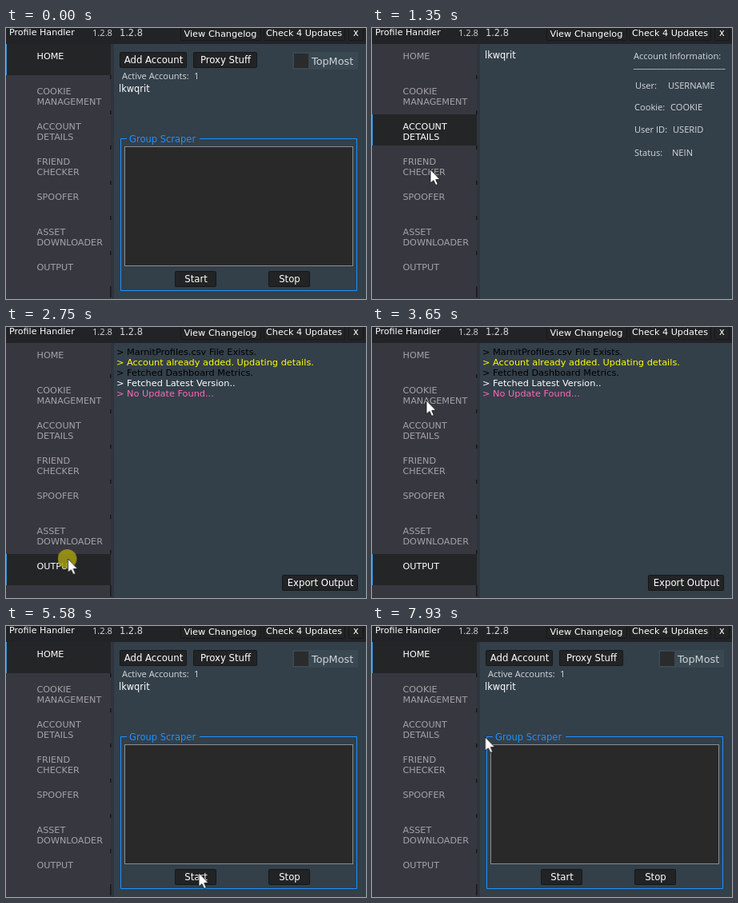
An HTML page that plays this animation: 450x339 px, repeating every 8 s.

```html
<!DOCTYPE html>
<html lang="en">
<head>
<meta charset="utf-8">
<title>Tool window</title>
<style>
html, body { margin: 0; width: 100%; height: 100%; overflow: hidden; background: #333f49; }
svg { display: block; }
text { font: 11.4px "DejaVu Sans", sans-serif; fill: #fff; white-space: pre; }
.ui { font: 11.1px "Open Sans", sans-serif; fill: #d6d9db; }
.tab { font-size: 11.2px; fill: #a3a2a8; }
.log { font-size: 11.3px; }
.on { fill: #fff; }
.btn { fill: #222324; stroke: #15181a; }
.mid { text-anchor: middle; font-size: 11.7px; }
.ink { fill: #000; }

.page { animation: 8s step-end infinite; }
#home { animation-name: home; }
#cookie { animation-name: cookie; }
#account { animation-name: account; }
#friend { animation-name: friend; }
#spoofer { animation-name: spoofer; }
#asset { animation-name: asset; }
#output { animation-name: output; }
@keyframes home { 0%, 47.5% { visibility: visible } 5.625% { visibility: hidden } }
@keyframes cookie { 0%, 11.75% { visibility: hidden } 5.625% { visibility: visible } }
@keyframes account { 0%, 17.75% { visibility: hidden } 11.75% { visibility: visible } }
@keyframes friend { 0%, 23.375% { visibility: hidden } 17.75% { visibility: visible } }
@keyframes spoofer { 0%, 30% { visibility: hidden } 23.375% { visibility: visible } }
@keyframes asset { 0%, 33.5% { visibility: hidden } 30% { visibility: visible } }
@keyframes output { 0%, 47.5% { visibility: hidden } 33.5% { visibility: visible } }

#cursor { animation: move 8s linear infinite; }
@keyframes move {
  0%, 1.5% { transform: translate(-30px, 60px) }
  5.625%, 6.5% { transform: translate(76px, 88px) }
  11.75%, 12.5% { transform: translate(75px, 132px) }
  16.875%, 18.375% { transform: translate(73px, 177px) }
  23.375%, 24.375% { transform: translate(76px, 218px) }
  29%, 31% { transform: translate(77.5px, 260px) }
  33.5%, 36% { transform: translate(77.5px, 290px) }
  43.75% { transform: translate(75px, 150px) }
  47.25%, 48.75% { transform: translate(62px, 42px) }
  53.5% { transform: translate(236px, 153px) }
  57.875% { transform: translate(267.5px, 252px) }
  64%, 65% { transform: translate(225px, 311px) }
  65.625%, 69.75% { transform: translate(241px, 309px) }
  74.375% { transform: translate(257px, 250px) }
  79.375% { transform: translate(241px, 188px) }
  81%, 87.625% { transform: translate(250.5px, 154.5px) }
  90.6% { transform: translate(269px, 115px) }
  93.75% { transform: translate(240px, 79px) }
  97.375% { transform: translate(169px, 91px) }
  99.125%, 100% { transform: translate(141.5px, 139px) }
}
#click { animation: click 8s step-end infinite; }
@keyframes click {
  0%, 8%, 14.2%, 20.2%, 25.8%, 32.3%, 36%, 50% { visibility: hidden }
  5.625%, 11.75%, 17.75%, 23.375%, 30%, 33.5%, 47.5% { visibility: visible }
}
</style>
</head>
<body>
<svg id="stage" width="450" height="339" viewBox="0 0 450 339"></svg>
<script>
const text = (x, y, s, cls = "", style = "") =>
  `<text x="${x}" y="${y}" class="${cls}" style="${style}">${s}</text>`;
const ui = (x, y, s, fill = "") => text(x, y, s, "ui", fill && `fill:${fill}`);
const rect = (x, y, w, h, fill, stroke = "none") =>
  `<rect x="${x}" y="${y}" width="${w}" height="${h}" fill="${fill}" stroke="${stroke}"/>`;
const button = (x, y, w, h, label) =>
  `<rect class="btn" x="${x + .5}" y="${y + .5}" width="${w - 1}" height="${h - 1}" rx="1"/>` +
  text(x + w / 2 + .5, y + h / 2 + 4, label, "mid");
const lines = (x, y, list, draw) => list.map((s, i) => draw(x, y + 13 * i, s)).join("");

const tabs = [
  ["home", "HOME"], ["cookie", "COOKIE", "MANAGEMENT"], ["account", "ACCOUNT", "DETAILS"],
  ["friend", "FRIEND", "CHECKER"], ["spoofer", "SPOOFER"],
  ["asset", "ASSET", "DOWNLOADER"], ["output", "OUTPUT"]
];
const label = (i, cls) =>
  lines(38.5, 39 + 44 * i, tabs[i].slice(1), (x, y, s) => text(x, y, s, "tab " + cls));

const user = "lkwqrit";
const pages = {
  home:
    button(142, 30, 84, 20, "Add Account") + button(234, 30, 80, 20, "Proxy Stuff") +
    rect(358, 30, 82, 22, "#3a4852") + rect(360, 32, 18, 18, "#2a2b2c") +
    text(382, 46, "TopMost", "", "font-size:12.8px;fill:#cfd6d8") +
    ui(145, 64, "Active Accounts:") + ui(235, 64, "1") + text(141, 80, user) +
    `<path d="M151 138.5H143.5V328.5H438.5V138.5H242" fill="none" stroke="#1e90ff"/>` +
    text(154, 143, "Group Scraper", "", "fill:#1e90ff;font-size:11.5px") +
    rect(148.5, 148.5, 285, 149, "#292929", "#8a8c8e") +
    button(211, 304, 52, 20, "Start") + button(328, 304, 52, 20, "Stop"),

  account:
    text(141, 38, user) + ui(327, 39, "Account Information:") + ui(327, 50, "_".repeat(23)) +
    ui(329, 76, "User:") + ui(370, 76, "USERNAME") +
    ui(328, 103, "Cookie:") + ui(373, 103, "COOKIE") +
    ui(328, 131, "User ID:") + ui(376, 131, "USERID") +
    ui(328, 160, "Status:") + ui(375, 160, "NEIN"),

  spoofer:
    ui(141, 41, "Welcome to the Spoofer. A simple HWID ban work around.") +
    rect(141, 45, 299, 81, "#f0f0f0") +
    `<svg x="141" y="45" width="299" height="80">` +
    lines(3.5, 14, [
      'User Agreement for "Profile Handler"', "Last Updated: 10/12/2023",
      "By submitting your name, a name, or an alias,", "you acknowledge that you have read,",
      "understood, and agree to be bound by the", "terms of this User Agreement."
    ], (x, y, s) => text(x, y, s, "ink")) + `</svg>` +
    rect(429, 64, 3, 18, "#7d8899") +
    ui(146, 148, "NAME:") + rect(188.5, 134.5, 171, 19, "#292929", "#707579") +
    button(367, 131, 72, 26, "SIGN") +
    ["DISK", "MACHINE", "DISPLAY ID", "MAC ADD.", "GUID", "PC NAME"].map((s, i) =>
      button([149, 252, 352][i % 3], i < 3 ? 161 : 210, 72, 26, s)).join("") +
    ui(142, 264, "*we are not responsible for how and what this is used for*", "#f00") +
    lines(149, 286.5, ["We are exploring other methods in hopes to make this",
      "part of the tool a bit more useful, and undetected."], (x, y, s) => ui(x, y, s, "#f00")) +
    button(141, 312, 80, 20, "Revert All") + ui(344, 323, "Credits to NovKez"),

  output:
    [["MarnitProfiles.csv File Exists.", "#000"],
     ["Account already added. Updating details.", "#ff0"],
     ["Fetched Dashboard Metrics.", "#000"],
     ["Fetched Latest Version..", "#fff"],
     ["No Update Found...", "#ff69b4"]].map(([s, c], i) =>
      text(138, 35 + 13 * i, "&gt; " + s, "log", `fill:${c}`)).join("") +
    button(345, 310, 95, 20, "Export Output")
};

const frame =
  rect(0, 0, 450, 339, "#333f49") + rect(0, 20, 131, 319, "#37383f") +
  rect(131, 20, 4, 319, "#30353d") + rect(0, 0, 450, 20, "#212326") +
  tabs.map((t, i) => label(i, "") + rect(130, 59 + 44 * i, 1.5, i < 6 ? 5 : 14, "#18191b")).join("") +
  text(4, 8.5, "Profile Handler", "", "font-size:11.1px") +
  ui(108, 10, "1.2.8") + text(142, 10, "1.2.8", "", "fill:#d6d9db") +
  button(218, -4, 101, 20, "") + button(322, -4, 102, 20, "") + button(428, -4, 19, 20, "") +
  text(222.5, 10.5, "View Changelog", "", "font-size:11.3px") +
  text(325, 10, "Check 4 Updates", "", "font-size:11.2px") + text(434, 10, "x");

const views = tabs.map(([id], i) =>
  `<g class="page" id="${id}">` + rect(0, 20 + 44 * i, 131, 39, "#242526") +
  rect(0, 20 + 44 * i, 1, 39, "#3b9be0") + label(i, "on") + (pages[id] || "") + `</g>`).join("");

const cursor = `<g id="cursor">
  <circle id="click" cx="-1" r="12" fill="#a59c12" fill-opacity=".85"/>
  <path d="M0 0V17L3.9 13.7L6.7 19.6L9.3 18.4L6.7 12.6H12Z" fill="#fff" stroke="#111" stroke-width=".8"/>
</g>`;

document.getElementById("stage").innerHTML = frame + views + cursor;
</script>
</body>
</html>
```
